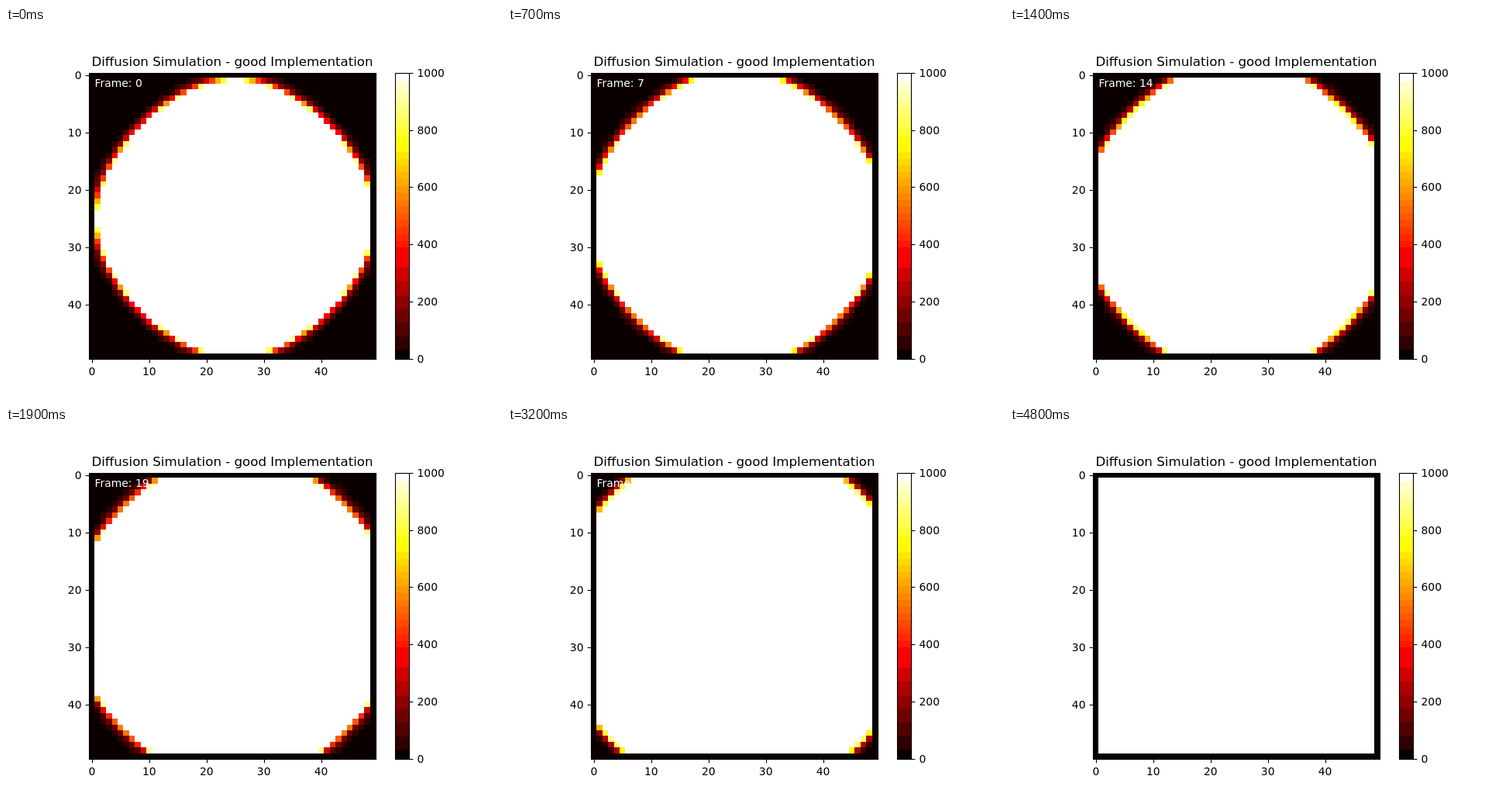
Write an HTML page with a canvas that moves like this. It is 640x480 px and loops after 10000 ms.

```html
<!DOCTYPE html>
<html lang="en">
<head>
<meta charset="utf-8">
<title>Diffusion Simulation</title>
<style>
  html, body { margin: 0; width: 100%; height: 100%; overflow: hidden; background: #fff; }
  canvas { display: block; }
</style>
</head>
<body>
<canvas id="stage" width="640" height="480"></canvas>
<script>
const ctx = document.getElementById('stage').getContext('2d');
const LOOP = 10000, STEP = 100, LAST = 48;
const SIZE = 50, CENTER = 25;
const FONT = '"DejaVu Sans", sans-serif';

const clamp = (v, lo, hi) => Math.min(hi, Math.max(lo, v));

// "Hot" colour map, posterised into bands of 32 red, 16 green and 32 blue levels.
function band(level, size, low, high) {
  if (level < size) return low;
  if (level >= 256 - size) return high;
  return Math.floor(level / size) * size + size / 2;
}

function hot(value) {
  const v = clamp(value / 1000, 0, 1);
  const r = 255 * clamp(0.0416 + v * 2.6252, 0, 1);
  const g = 255 * clamp((v - 0.365) / 0.381, 0, 1);
  const b = 255 * clamp((v - 0.746) / 0.254, 0, 1);
  const green = band(g, 16, 0, b < 32 ? 252 : 255);
  const red = band(r, 32, 10, green ? 255 : 248);
  return `rgb(${red},${green},${band(b, 32, b ? 8 : 0, 255)})`;
}

// Lattice heat kernel: asymptotic form of the modified Bessel function I_d(x).
function kernel(d, x) {
  const h = Math.hypot(d, x);
  return Math.exp(h - d * Math.asinh(d / x)) / Math.sqrt(2 * Math.PI * h);
}

// Spread along one axis; a mirror source keeps the wall at zero.
function profile(x) {
  return Array.from({ length: SIZE }, (_, i) => {
    const d = Math.abs(i - CENTER);
    const wall = i < CENTER ? CENTER : SIZE - 1 - CENTER;
    return i === 0 || i === SIZE - 1 ? 0 : kernel(d, x) - kernel(2 * wall - d, x);
  });
}

function drawField(step) {
  const spread = profile(10 + 0.14 * step);
  const strength = Math.exp(14.22 - 0.11 * step + 0.00034 * step * step);
  const edge = (origin, i) => Math.round(origin + 7.4 * i);
  for (let row = 0; row < SIZE; row++) {
    const y = Math.max(58, edge(57, row)), bottom = edge(57, row + 1);
    for (let col = 0; col < SIZE; col++) {
      const x = edge(107, col);
      ctx.fillStyle = hot(strength * spread[row] * spread[col]);
      ctx.fillRect(x, y, edge(107, col + 1) - x, bottom - y);
    }
  }
}

function drawColorbar() {
  for (let y = 58; y < 428; y++) {
    ctx.fillStyle = hot(1000 * (427.2 - y - 0.5) / 369.6);
    ctx.fillRect(502, y, 19, 1);
  }
}

function text(label, x, y, align, size = 13.889, color = '#000') {
  ctx.font = `${size}px ${FONT}`;
  ctx.textAlign = align;
  ctx.fillStyle = color;
  ctx.fillText(label, x, y);
}

function line(x, y, dx, dy) {
  ctx.beginPath();
  ctx.moveTo(x, y);
  ctx.lineTo(x + dx, y + dy);
  ctx.stroke();
}

const snap = v => Math.round(v) + 0.5;

function drawAxes() {
  ctx.strokeStyle = '#000';
  ctx.lineWidth = 1.11;
  ctx.strokeRect(107.5, 58.5, 370, 369);
  ctx.strokeRect(502.5, 58.5, 18, 369);
  for (let n = 0; n < SIZE; n += 10) {
    const offset = 7.392 * (n + 0.5);
    const x = 107.2 + offset, y = 57.6 + offset;
    line(snap(x), 427.5, 0, 4.86);
    text(n, x, 448, 'center');
    line(107.5, snap(y), -4.86, 0);
    text(n, 97.5, Math.round(y + 5), 'right');
  }
  for (let n = 0; n <= 1000; n += 200) {
    const y = 427.2 - 0.3696 * n;
    line(520.5, snap(y), 4.86, 0);
    text(n, 530.5, Math.round(y + 5), 'left');
  }
  text('Diffusion Simulation - good Implementation', 292, 49, 'center', 16.667);
}

function render(step) {
  ctx.fillStyle = '#fff';
  ctx.fillRect(0, 0, 640, 480);
  drawField(step);
  drawColorbar();
  drawAxes();
  text('Frame: ' + step, 114.6, 76, 'left', 13.889, '#fff');
}

let shown = -1;
const start = performance.now();

function tick() {
  const time = (performance.now() - start) % LOOP;
  const step = Math.min(LAST, Math.floor(time / STEP));
  if (step !== shown) render(shown = step);
  requestAnimationFrame(tick);
}
tick();
</script>
</body>
</html>
```
